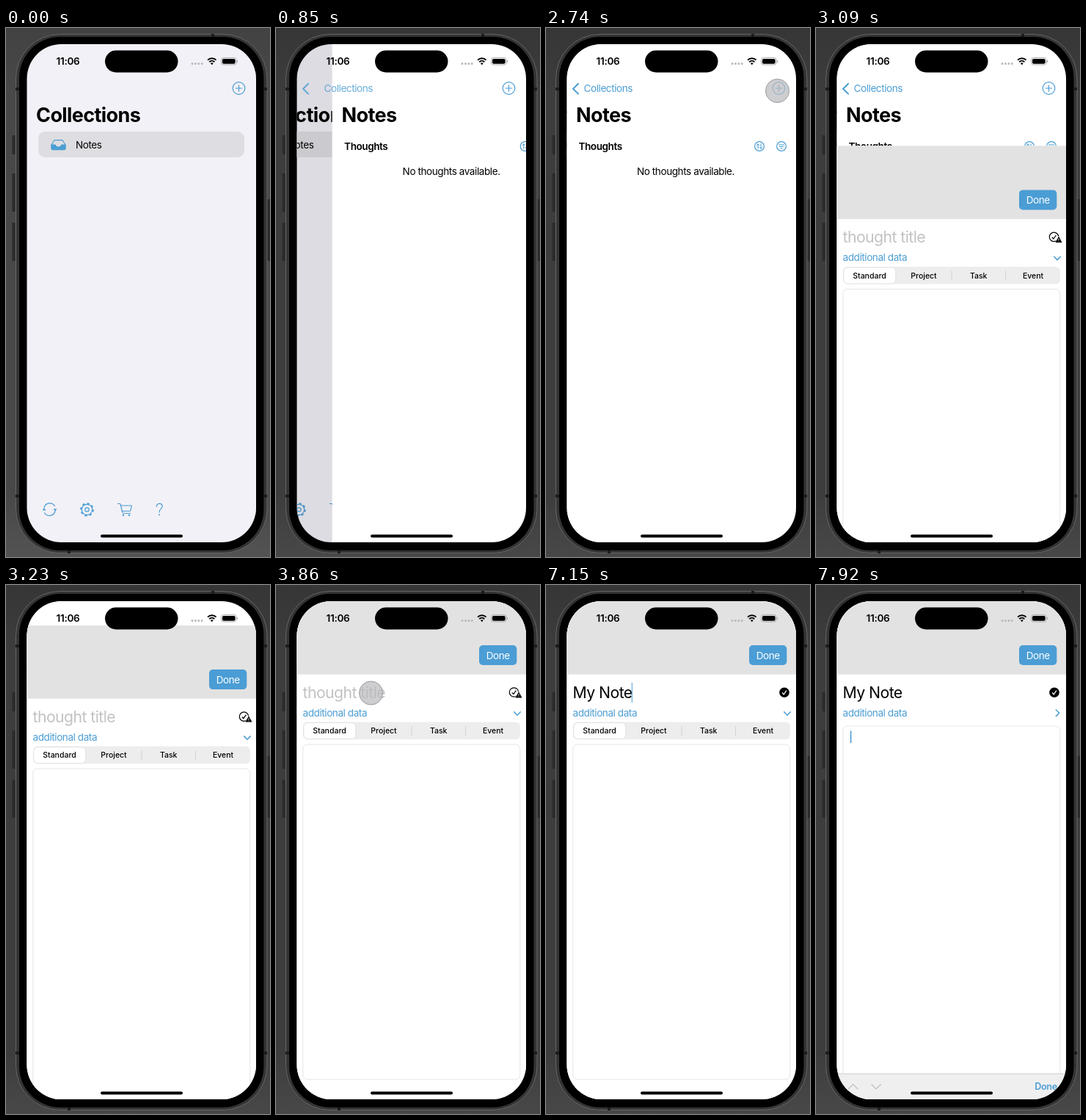
Write an HTML page that moves like this. It is 360 px wide and 720 px high and loops after 7990 ms.

```html
<!DOCTYPE html>
<html lang="en">
<head>
<meta charset="utf-8">
<title>Notes demo</title>
<style>
  html, body { margin: 0; height: 100%; overflow: hidden; background: #3c3c3c; }
  svg { display: block; width: 100%; height: 100%; }
  text { font: 13.5px Inter, sans-serif; letter-spacing: -.03em; white-space: pre; }
  .large { font-size: 27px; font-weight: 700; letter-spacing: -.022em; }
  .bold { font-weight: 600; }
  .field { font-size: 21.2px; letter-spacing: -.025em; }
  .tab { font-size: 10.5px; font-weight: 500; letter-spacing: 0; text-anchor: middle; }
  .blue { fill: #4b9dd3; }
  .line { fill: none; stroke: #4b9dd3; stroke-width: 1.2; stroke-linecap: round; stroke-linejoin: round; }
  .tap { fill: #bcbcc0; fill-opacity: .72; stroke: #98989c; stroke-width: 1; }
</style>
</head>
<body>
<svg viewBox="0 0 360 720" preserveAspectRatio="none">
  <defs>
    <clipPath id="screen"><rect x="28.5" y="22" width="312.5" height="678" rx="47"/></clipPath>
    <linearGradient id="shade" x2="0" y2="1">
      <stop stop-color="#363636"/><stop offset=".12" stop-color="#3d3d3d"/>
      <stop offset=".88" stop-color="#3d3d3d"/><stop offset="1" stop-color="#484848"/>
    </linearGradient>
  </defs>

  <!-- phone body -->
  <rect width="360" height="720" fill="url(#shade)"/>
  <rect id="glow" width="360" height="720" fill="#fff" opacity=".06"/>
  <path d="M10.5 146v26M10.5 198v52M10.5 265v52M358 233v84" stroke="#2b2b2b" stroke-width="4"/>
  <rect x="13.5" y="8.5" width="342.5" height="706" rx="60" fill="#343434" stroke="#666"/>
  <path d="M282 8v4M86 711v4M13 83h5M13 637h5M352 83h4M352 637h4" stroke="#1c1c1c" stroke-width="4"/>
  <rect x="18" y="12" width="333.5" height="699" rx="56"/>

  <g clip-path="url(#screen)">
    <!-- collections -->
    <g id="collections">
      <rect x="28" y="22" width="313" height="678" fill="#f2f1f7"/>
      <text class="large" x="41" y="128">Collections</text>
      <rect x="44" y="141" width="281" height="35" rx="9" fill="#dedde1"/>
      <path class="line" d="M62 159l4-6.3h11l4 6.3"/>
      <path class="blue" d="M61.3 158.5h6.2q1 3 4 3t4-3h6.2v5q0 2.7-2.7 2.7h-15q-2.7 0-2.7-2.7z"/>
      <text x="95" y="163.500">Notes</text>
      <g class="line">
        <path d="M52 653a8 8 0 0 1 14.500-2.500M67 657.500a8 8 0 0 1-14.500 2.500"/>
        <path class="blue" d="M64.500 654.500h5l-2.500 3.300zM49.500 656.500h5l-2.500-3.300z" stroke="none"/>
        <circle cx="110.500" cy="655.500" r="8.400" pathLength="16" stroke-width="1.900" stroke-dasharray="1 1" stroke-linecap="butt"/>
        <circle cx="110.500" cy="655.500" r="7.200"/>
        <circle cx="110.500" cy="655.500" r="2.700"/>
        <path d="M152.500 647.500h2.500q1 0 1.200 1l2.300 10q.4 2 2.400 2h8.600M156.500 650h14.800l-1.300 6.500q-.2.900-1.200 1h-10.300"/>
        <path d="M205.300 651.300q.2-4 4-4t3.800 3.800c0 3.700-4 3.400-4 7.400v.5"/>
      </g>
      <g class="blue">
        <circle cx="160" cy="663" r="1.300"/><circle cx="168" cy="663" r="1.300"/><circle cx="209.100" cy="662.500" r="1.100"/>
      </g>
    </g>
    <rect id="dim" x="28" y="22" width="313" height="678" opacity="0"/>

    <!-- notes -->
    <g id="notes">
      <rect x="28" y="22" width="313" height="678" fill="#fff"/>
      <text class="large" x="41" y="128">Notes</text>
      <text class="bold" x="44.500" y="166">Thoughts</text>
      <text x="190.500" y="200" text-anchor="middle">No thoughts available.</text>
      <g class="line">
        <circle cx="291" cy="161" r="6.400"/>
        <path d="M289.200 164.300v-6.500l-1.800 1.800M289.200 157.800l1.500 1.600M293 157.800v6.500l-1.700-1.700M293 164.300l1.700-1.700" stroke-width="1"/>
        <circle cx="321" cy="161" r="6.400"/>
        <path d="M317.300 159h7.400M318.500 161.500h5M319.800 164h2.400" stroke-width="1"/>
      </g>
    </g>
    <path id="backArrow" class="line" d="M44 75.800l-7 6.900 7 6.900" style="stroke-width:2"/>
    <text id="backLabel" class="blue" x="51.500" y="87.300">Collections</text>
    <g class="line"><circle cx="317.500" cy="82" r="8.300"/><path d="M313.300 82h8.400M317.500 77.800v8.400"/></g>
    <circle id="tapAdd" class="tap" cx="315.500" cy="85.500" r="16"/>

    <!-- editor -->
    <g id="sheet">
      <rect x="28" y="22" width="313" height="678" fill="#fff"/>
      <rect x="28" y="22" width="313" height="99.700" fill="#e2e2e2"/>
      <rect x="277" y="82" width="51.300" height="27" rx="5" fill="#4b9dd5"/>
      <text x="302.800" y="100.500" text-anchor="middle" fill="#fff">Done</text>
      <text id="placeholder" class="field" x="36.500" y="154" fill="#c2c2c5">thought title</text>
      <text id="title" class="field" x="36.500" y="154"></text>
      <rect id="titleCursor" y="133" width="1.600" height="27" class="blue"/>
      <g id="incomplete">
        <circle cx="324.500" cy="146" r="6.200" fill="none" stroke="#000" stroke-width="1.200"/>
        <path d="M321.800 146.300l2 2.300 3.600-5" fill="none" stroke="#000" stroke-width="1.200"/>
        <path d="M331 145.200l4.500 8.300h-9z" stroke="#fff" stroke-width="1" paint-order="stroke"/>
        <path d="M331 148.300v2.200M331 151.500v.8" stroke="#fff"/>
      </g>
      <g id="complete">
        <circle cx="325" cy="146.200" r="6.800"/>
        <path d="M322.200 146.500l2 2.400 3.700-5.300" fill="none" stroke="#fff" stroke-width="1.200"/>
      </g>
      <text class="blue" x="36.500" y="179">additional data</text>
      <path id="chevron" class="line" d="M-4.300-2.200L0 2.200 4.300-2.200" style="stroke-width:1.500"/>
      <g id="tabs">
        <rect x="37" y="186.500" width="296" height="23.700" rx="6" fill="#ededee"/>
        <rect x="37.700" y="187.500" width="71" height="22" rx="5.500" fill="#fff" stroke="#d9d9da" stroke-width=".7"/>
        <path d="M185 192v13M258.500 192v13" stroke="#d2d2d4"/>
        <text class="tab bold" x="73" y="202.200">Standard</text>
        <text class="tab" x="147" y="202.200">Project</text>
        <text class="tab" x="221.700" y="202.200">Task</text>
        <text class="tab" x="296" y="202.200">Event</text>
      </g>
      <rect id="body" x="36.800" width="296" rx="6" fill="#fff" stroke="#e3e3e5" stroke-width=".9"/>
      <rect id="bodyCursor" x="46.700" y="198.500" width="1.600" height="16.500" class="blue"/>
      <circle id="tapTitle" class="tap" cx="129.500" cy="147" r="16"/>
    </g>

    <g id="toolbar">
      <rect x="28" y="665" width="313" height="36" fill="#efeff0"/>
      <path d="M28 665.200h313" stroke="#cfcfd1"/>
      <path d="M44 686l6.500-6.500 6.500 6.500M75.500 679.500l6.500 6.500 6.500-6.500" fill="none" stroke="#bdbdc0" stroke-width="1.200"/>
      <text class="bold blue" x="298.300" y="687.300" style="font-size:12.600px">Done</text>
    </g>
  </g>

  <!-- status bar and home indicator -->
  <text class="bold" x="68.500" y="50.200" style="letter-spacing:-.02em">11:06</text>
  <rect x="135" y="30.500" width="99.500" height="30" rx="15"/>
  <path d="M254 48.600h.01M258.400 48.600h.01M262.800 48.600h.01M267.200 48.600h.01" stroke="#b8b8bc" stroke-width="3" stroke-linecap="round"/>
  <path d="M275 43.600a8.300 8.300 0 0 1 11.600 0M277.300 46.200a5 5 0 0 1 7 0" fill="none" stroke="#000" stroke-width="1.900"/>
  <path d="M280.800 50.300l-1.900-2.200a2.800 2.800 0 0 1 3.800 0z"/>
  <rect x="293.500" y="40.500" width="20.500" height="9.600" rx="3" fill="none" stroke="#a5a5a8" stroke-width=".9"/>
  <rect x="294.900" y="41.900" width="17.700" height="6.800" rx="1.900"/>
  <path d="M315.400 44v2.800" stroke="#a5a5a8" stroke-width="1.200"/>
  <rect x="129" y="689.500" width="112" height="4" rx="2"/>
</svg>
<script>
  const LOOP = 7990, FIRST = 500, STEP = 70;
  const WIDTH = 312.5, HEIGHT = 678;
  const KEYS = [[4560, 'M'], [5260, 'y'], [5400, ' '], [5610, 'N'], [5960, 'o'], [6240, 't'], [6590, 'e']];

  const ui = Object.fromEntries([...document.querySelectorAll('svg [id]')].map(el => [el.id, el]));
  const fade = (el, amount) => el.setAttribute('opacity', amount);
  const move = (el, x, y, extra = '') => el.setAttribute('transform', `translate(${x} ${y})${extra}`);
  const during = (t, from, to) => t >= from && t < to ? 1 : 0;
  const ramp = (t, from, to) => Math.min(1, Math.max(0, (t - from) / (to - from)));

  // Critically damped spring from 0 to 1.
  function spring(t, start, rate) {
    const x = Math.max(0, t - start) / 1000 * rate;
    return 1 - (1 + x) * Math.exp(-x);
  }

  function render(t) {
    fade(ui.glow, t < FIRST ? .06 : 0);

    const push = t >= 1200 ? 1 : spring(t, 600, 13.3);
    move(ui.collections, -WIDTH * .3 * push, 0);
    fade(ui.dim, .1 * push);
    move(ui.notes, WIDTH * (1 - push), 0);
    fade(ui.backArrow, push);
    fade(ui.backLabel, push);
    move(ui.backLabel, 90 * (1 - push), 0);
    fade(ui.tapAdd, during(t, 2740, 2880));

    const rise = t >= 3510 ? 1 : spring(t, 2860, 12.9);
    move(ui.sheet, 0, HEIGHT * (1 - rise));
    fade(ui.tapTitle, during(t, 3860, 4000));

    const typed = KEYS.filter(([at]) => t >= at).map(([, key]) => key).join('');
    ui.title.textContent = typed;
    fade(ui.placeholder, typed ? 0 : 1);
    const caret = typed ? 36 + ui.title.getComputedTextLength() : 36.3;
    ui.titleCursor.setAttribute('x', caret - .6);
    fade(ui.titleCursor, during(t, 3930, 7150) + .65 * during(t, 7150, 7220));
    const done = ramp(t, 4490, 4770);
    fade(ui.incomplete, 1 - done);
    fade(ui.complete, done);

    const collapse = t >= 7780 ? 1 : spring(t, 7200, 13);
    const top = 217 - 25 * collapse;
    move(ui.chevron, 329 + .5 * collapse, 175 - .7 * collapse, ` rotate(${-90 * collapse})`);
    fade(ui.tabs, 1 - ramp(collapse, 0, .8));
    ui.body.setAttribute('y', top);
    ui.body.setAttribute('height', 673 - top);
    fade(ui.bodyCursor, ramp(t, 7290, 7430));
    move(ui.bodyCursor, 0, 25 * (1 - collapse));
    move(ui.toolbar, 0, t >= 7920 ? 0 : 36 * (1 - spring(t, 7300, 11)));
  }

  function tick(now) {
    const t = now % LOOP;
    render(t < FIRST ? 0 : FIRST + Math.floor((t - FIRST) / STEP) * STEP);
    requestAnimationFrame(tick);
  }
  render(0);
  requestAnimationFrame(tick);
</script>
</body>
</html>
```
